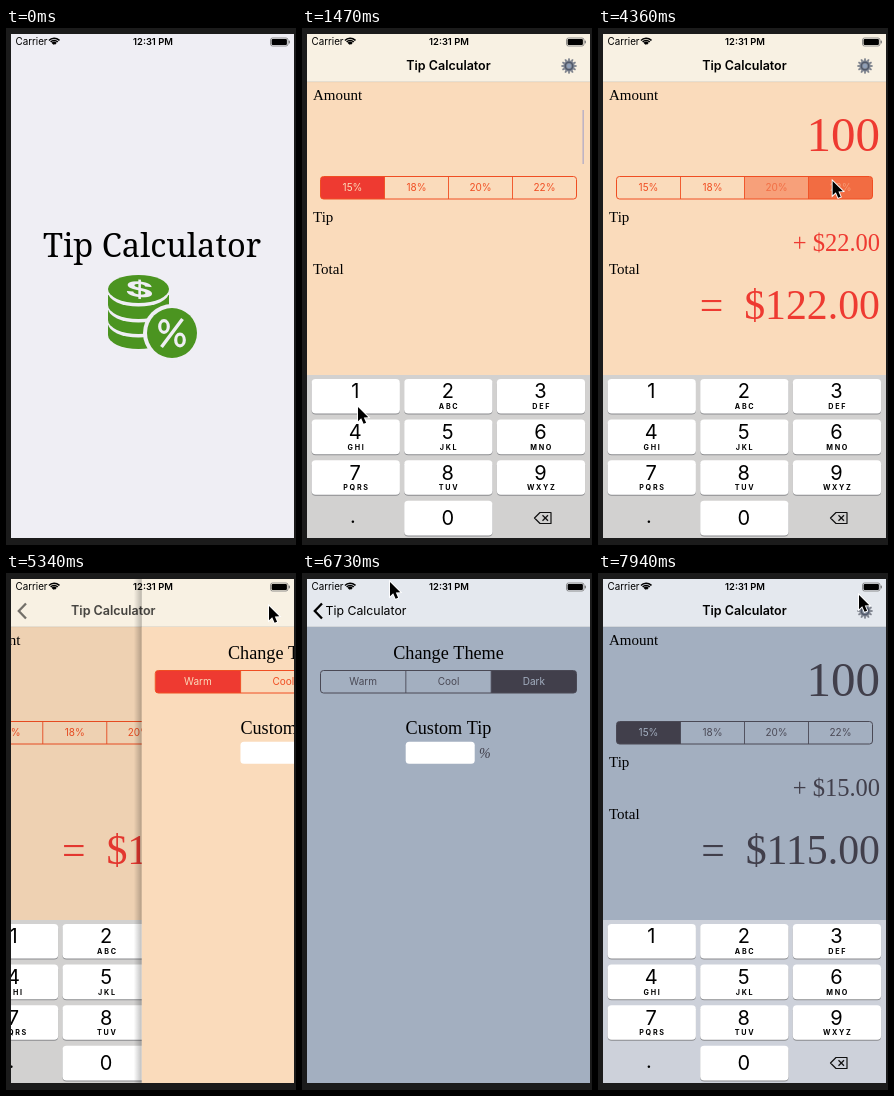
An HTML page with a canvas for the animation above (7990 ms loop, 290 by 517 pixels).

```html
<!DOCTYPE html>
<html lang="en">
<head>
<meta charset="utf-8">
<title>Tip Calculator</title>
<style>
  html, body { margin: 0; width: 100%; height: 100%; overflow: hidden; background: #1b1b1b; }
  canvas { display: block; width: 100vw; height: 100vh; }
</style>
</head>
<body>
<canvas id="stage"></canvas>
<script>
const W = 290, H = 517, LOOP = 7990;
const SCREEN = { x: 5, y: 6, w: 283, h: 504 };
const SANS = 'Inter, Roboto, sans-serif';
const SERIF = '"Liberation Serif", "Noto Serif", serif';
const WARM = { bg: '#fadbbb', bar: '#f8f1e3', tint: '#ee3a31', line: '#f04e22', board: '#d2d1d0' };
const DARK = { bg: '#a3afc0', bar: '#e4e8ee', tint: '#413f4b', line: '#4a4955', board: '#cdd1da' };
const LAUNCH_BG = '#efeef4', GREEN = '#4b9420';

// Timeline, in ms
const LAUNCH_FADE = [940, 1200];
const PUSH = 5238, POP = 6935, THEME_TAP = 6110;
const AMOUNTS = [[0, 0], [1830, 1], [2290, 10], [2470, 100]];
const RATE_TAPS = [[0, 0], [3150, 1], [3700, 2], [4260, 3], [6500, 0]];
const THEME_TAPS = [[0, 0], [THEME_TAP, 2]];
const RATES = [15, 18, 20, 22];
const KEY_PRESSES = [['1', 1770, 1830], ['0', 2230, 2470]];
const CARET_ON = [[1430, 2950], [3450, 3950], [4450, 4950], [7500, 7800]];
const POINTER = [
  [1200, 110, 522], [1470, 56, 379], [1650, 52, 366], [1830, 52, 366], [2000, 146, 483],
  [2600, 146, 483], [2870, 174, 172], [3150, 118, 157], [3300, 116, 157], [3700, 180, 155],
  [3850, 182, 154], [4260, 233, 153], [4400, 235, 153], [4750, 278, 72], [5000, 263, 33],
  [5480, 263, 33], [6020, 232, 103], [6280, 231, 102], [6730, 88, 9], [6880, 62, 32],
  [7120, 60, 33], [7720, 268, 14], [7940, 261, 22]
];

const canvas = document.getElementById('stage');
const ctx = canvas.getContext('2d');

const clamp = v => Math.max(0, Math.min(1, v));
const ramp = (t, from, to) => clamp((t - from) / (to - from));
const smooth = u => u * u * (3 - 2 * u);
const latest = (list, t) => list.filter(entry => entry[0] <= t).pop();

function spring(ms) {
  const u = Math.max(0, ms) * 0.0175;
  return ms > 520 ? 1 : 1 - (1 + u) * Math.exp(-u);
}

function withAlpha(alpha, draw) {
  if (alpha <= 0) return;
  ctx.save();
  ctx.globalAlpha *= alpha;
  draw();
  ctx.restore();
}

function text(str, x, y, font, color = '#000', align = 'left', spacing = 0) {
  ctx.font = font;
  ctx.fillStyle = color;
  ctx.textAlign = align;
  ctx.letterSpacing = spacing + 'px';
  ctx.fillText(str, x, y);
}

function rect(x, y, w, h, color) {
  ctx.fillStyle = color;
  ctx.fillRect(x, y, w, h);
}

function roundRect(x, y, w, h, r, color) {
  ctx.beginPath();
  ctx.roundRect(x, y, w, h, r);
  ctx.fillStyle = color;
  ctx.fill();
}

function ellipse(x, y, rx, ry, color) {
  ctx.beginPath();
  ctx.ellipse(x, y, rx, ry, 0, 0, 7);
  ctx.fillStyle = color;
  ctx.fill();
}

function line(points, color, width) {
  ctx.beginPath();
  points.forEach(([x, y]) => ctx.lineTo(x, y));
  ctx.strokeStyle = color;
  ctx.lineWidth = width;
  ctx.stroke();
}

function ring(x, y, rx, ry, color, width) {
  ctx.beginPath();
  ctx.ellipse(x, y, rx, ry, 0, 0, 7);
  ctx.strokeStyle = color;
  ctx.lineWidth = width;
  ctx.stroke();
}

function drawStatusBar() {
  text('Carrier', 9.5, 17, '9.8px ' + SANS);
  ctx.lineCap = 'butt';
  [2.4, 4.9, 7.2].forEach((r, i) => {
    ctx.beginPath();
    ctx.arc(48.2, 17.4, r, -Math.PI * 0.76, -Math.PI * 0.24);
    ctx.strokeStyle = '#000';
    ctx.lineWidth = i ? 1.5 : 2.6;
    ctx.stroke();
  });
  text('12:31 PM', 147, 17, '600 9.4px ' + SANS, '#000', 'center');
  ctx.beginPath();
  ctx.roundRect(264.5, 10, 17.5, 8, 2);
  ctx.strokeStyle = '#777';
  ctx.lineWidth = 0.8;
  ctx.stroke();
  roundRect(265.6, 11.1, 15.3, 5.8, 1, '#000');
  roundRect(282.7, 12.6, 1.2, 2.8, 0.6, '#777');
}

function drawLaunch() {
  rect(SCREEN.x, SCREEN.y, SCREEN.w, SCREEN.h, LAUNCH_BG);
  text('Tip Calculator', 146, 229, '32.6px "Noto Serif", serif', '#000', 'center');

  const coin = (y, color, side = 10) => {
    rect(102, y - side, 61, side, color);
    ellipse(132.5, y, 30.5, 14, color);
  };
  coin(307, GREEN);
  for (const y of [292, 277]) {
    coin(y + 3.5, LAUNCH_BG);
    coin(y, GREEN);
  }
  coin(264.5, LAUNCH_BG, 0);
  coin(261, GREEN, 0);

  ctx.save();
  ctx.translate(133.5, 269);
  ctx.transform(2.1, 0.2, 0, 1, 0, 0);
  text('$', 0, 0, '700 21px ' + SANS, LAUNCH_BG, 'center');
  ctx.restore();

  ellipse(166, 305, 29, 29, LAUNCH_BG);
  ellipse(166, 305, 25, 25, GREEN);
  line([[176.5, 291], [155.5, 319]], LAUNCH_BG, 3.4);
  ring(158, 298.5, 4.3, 5.8, LAUNCH_BG, 3.2);
  ring(174, 312, 4.3, 5.8, LAUNCH_BG, 3.2);
}

function drawSegments(y, labels, taps, t, theme) {
  const x = 18.5, w = 256, h = 22.5, step = w / labels.length;
  const current = latest(taps, t);
  const previous = taps[taps.indexOf(current) - 1];
  const u = 1 - (1 - ramp(t, current[0], current[0] + 220)) ** 2;
  const level = i => i === current[1] ? (previous ? u : 1)
    : previous && i === previous[1] ? 1 - u : 0;

  ctx.save();
  ctx.beginPath();
  ctx.roundRect(x, y, w, h, 3);
  ctx.clip();
  labels.forEach((_, i) => withAlpha(level(i) ** 0.7, () =>
    rect(x + i * step, y, step, h, level(i) === 1 ? theme.tint : theme.line)));
  ctx.restore();

  labels.forEach((label, i) => {
    const draw = color => () =>
      text(label, x + (i + 0.5) * step, y + 14.9, '10px ' + SANS, color, 'center');
    withAlpha(1 - level(i), draw(theme.line));
    withAlpha(level(i) ** 2, draw(theme.bg));
    if (i) line([[x + i * step, y], [x + i * step, y + h]], theme.line, 0.9);
  });
  ctx.beginPath();
  ctx.roundRect(x, y, w, h, 3);
  ctx.strokeStyle = theme.line;
  ctx.lineWidth = 1;
  ctx.stroke();
}

function drawKeyboard(t, theme) {
  const letters = ['', 'ABC', 'DEF', 'GHI', 'JKL', 'MNO', 'PQRS', 'TUV', 'WXYZ'];
  const pressed = key => KEY_PRESSES.some(([k, from, to]) => k === key && t >= from && t < to);
  rect(SCREEN.x, 347, SCREEN.w, 163, theme.board);

  const key = (label, col, row, sub) => {
    const x = 9.6 + col * 92.6, y = 351 + row * 40.6;
    roundRect(x, y + 1, 88.3, 34.6, 4, '#8b8c8f');
    roundRect(x, y, 88.3, 34.6, 4, pressed(label) ? '#bcbec3' : '#fff');
    text(label, x + 43.6, y + (row === 3 ? 24.5 : 19.3), '20px ' + SANS, '#000', 'center');
    if (sub) text(sub, x + 44.9, y + 30, '700 7.2px ' + SANS, '#000', 'center', 1.7);
  };
  letters.forEach((sub, i) => key(String(i + 1), i % 3, Math.floor(i / 3), sub));
  key('0', 1, 3);
  text('.', 51, 495, '20px ' + SANS, '#000', 'center');

  ctx.lineJoin = 'round';
  const outline = [[232.5, 490], [238, 484.5], [249, 484.5], [249, 495.5], [238, 495.5], [232.5, 490], [238, 484.5]];
  line(outline, '#111', 1.2);
  line([[240.5, 487.3], [246, 492.7]], '#111', 1.2);
  line([[246, 487.3], [240.5, 492.7]], '#111', 1.2);
}

function drawCalculator(t, theme, shift) {
  const amount = latest(AMOUNTS, t)[1];
  const tip = amount * RATES[latest(RATE_TAPS, t)[1]] / 100;
  ctx.save();
  ctx.translate(-85 * shift, 0);
  rect(SCREEN.x, 54, SCREEN.w, 456, theme.bg);
  text('Amount', 11, 72, '15px ' + SERIF);
  text('Tip', 11, 194, '15px ' + SERIF);
  text('Total', 11, 245.5, '15px ' + SERIF);
  if (amount) {
    text(String(amount), 282, 122.5, '49px ' + SERIF, theme.tint, 'right');
    text('+ $' + tip.toFixed(2), 282, 223, '24.5px ' + SERIF, theme.tint, 'right');
    text('=\u00a0\u00a0$' + (amount + tip).toFixed(2), 282, 291, '41.8px ' + SERIF, theme.tint, 'right');
  }
  drawSegments(148.5, RATES.map(r => r + '%'), RATE_TAPS, t, theme);
  const caret = Math.max(...CARET_ON.map(([on, off]) =>
    Math.min(ramp(t, on, on + 120), 1 - ramp(t, off, off + 120))));
  withAlpha(caret, () => rect(280.4, 82, 1.6, 54, '#4b68d6'));
  withAlpha(0.09 * shift, () => rect(SCREEN.x, 54, SCREEN.w, 293, '#000'));
  drawKeyboard(t, theme);
  ctx.restore();
}

function drawSettings(t, theme, shift) {
  ctx.save();
  ctx.translate(SCREEN.w * (1 - shift), 0);
  if (shift < 1) {
    const shade = ctx.createLinearGradient(-3, 0, 5, 0);
    shade.addColorStop(0, 'rgba(0,0,0,0)');
    shade.addColorStop(1, 'rgba(0,0,0,.25)');
    rect(-3, SCREEN.y, 8, SCREEN.h, shade);
  }
  rect(SCREEN.x, 54, SCREEN.w, 456, theme.bg);
  text('Change Theme', 146.5, 86, '18.2px ' + SERIF, '#000', 'center');
  drawSegments(97.5, ['Warm', 'Cool', 'Dark'], THEME_TAPS, t, theme);
  text('Custom Tip', 146.5, 161, '18.2px ' + SERIF, '#000', 'center');
  roundRect(103.7, 168.8, 69, 22, 3.5, '#fff');
  text('%', 177, 185, 'italic 14px ' + SERIF, '#413f4b');
  ctx.restore();
}

function drawGear() {
  ctx.save();
  ctx.translate(267, 38);
  for (let i = 0; i < 12; i++) {
    ctx.rotate(Math.PI / 6);
    rect(-0.9, -7.6, 1.8, 3, '#7d828c');
  }
  ellipse(0, 0, 5.7, 5.7, '#858a95');
  ring(0, 0, 3.7, 3.7, '#4f586a', 1.5);
  ellipse(0, 0, 2.2, 2.2, '#8f9fb8');
  ctx.restore();
}

function drawNavBar(t, theme, shift) {
  rect(SCREEN.x, SCREEN.y, SCREEN.w, 48, theme.bar);
  rect(SCREEN.x, 53.6, SCREEN.w, 0.5, 'rgba(0,0,0,.2)');
  const x = 146.5 - 82.5 * shift ** 1.2;
  withAlpha(1 - shift ** 2, () => text('Tip Calculator', x, 42, '600 12.5px ' + SANS, '#000', 'center'));
  withAlpha(shift ** 4, () => text('Tip Calculator', x, 42, '12.3px ' + SANS, '#000', 'center'));
  ctx.lineJoin = 'miter';
  withAlpha(shift, () => line([[20, 30.5], [12.8, 38], [20, 45.5]], '#000', 2.3));
  const touch = t >= 5090 && t < PUSH ? 0.4 : 1;
  withAlpha(touch * clamp(1 - 2 * shift), drawGear);
}

function drawPointer(t) {
  if (t < POINTER[0][0]) return;
  const from = latest(POINTER, t);
  const to = POINTER[POINTER.indexOf(from) + 1] || from;
  const u = to === from ? 0 : smooth(ramp(t, from[0], to[0]));
  ctx.save();
  ctx.translate(from[1] + (to[1] - from[1]) * u, from[2] + (to[2] - from[2]) * u);
  ctx.beginPath();
  [[0, 0], [0, 14.3], [3.2, 11.3], [5.6, 16.8], [8.1, 15.7], [5.8, 10.4], [10.3, 10.2]]
    .forEach(([x, y]) => ctx.lineTo(x, y));
  ctx.closePath();
  ctx.lineJoin = 'miter';
  ctx.strokeStyle = '#fff';
  ctx.lineWidth = 1.8;
  ctx.stroke();
  ctx.fillStyle = '#000';
  ctx.fill();
  ctx.restore();
}

function draw(t) {
  const theme = t < THEME_TAP ? WARM : DARK;
  const shift = t < POP ? spring(t - PUSH) : 1 - spring(t - POP);
  const launch = 1 - ramp(t, ...LAUNCH_FADE);
  rect(0, 0, W, H, '#1b1b1b');
  ctx.save();
  ctx.beginPath();
  ctx.rect(SCREEN.x, SCREEN.y, SCREEN.w, SCREEN.h);
  ctx.clip();
  if (launch < 1) {
    if (shift < 1) drawCalculator(t, theme, shift);
    drawNavBar(t, theme, shift);
    if (shift > 0) drawSettings(t, theme, shift);
  }
  withAlpha(launch, drawLaunch);
  drawStatusBar();
  ctx.restore();
  drawPointer(t);
}

function frame(now) {
  const ratio = window.devicePixelRatio || 1;
  const w = Math.round(innerWidth * ratio), h = Math.round(innerHeight * ratio);
  if (canvas.width !== w || canvas.height !== h) {
    canvas.width = w;
    canvas.height = h;
  }
  ctx.setTransform(w / W, 0, 0, h / H, 0, 0);
  draw(now % LOOP);
  requestAnimationFrame(frame);
}
requestAnimationFrame(frame);
</script>
</body>
</html>
```
